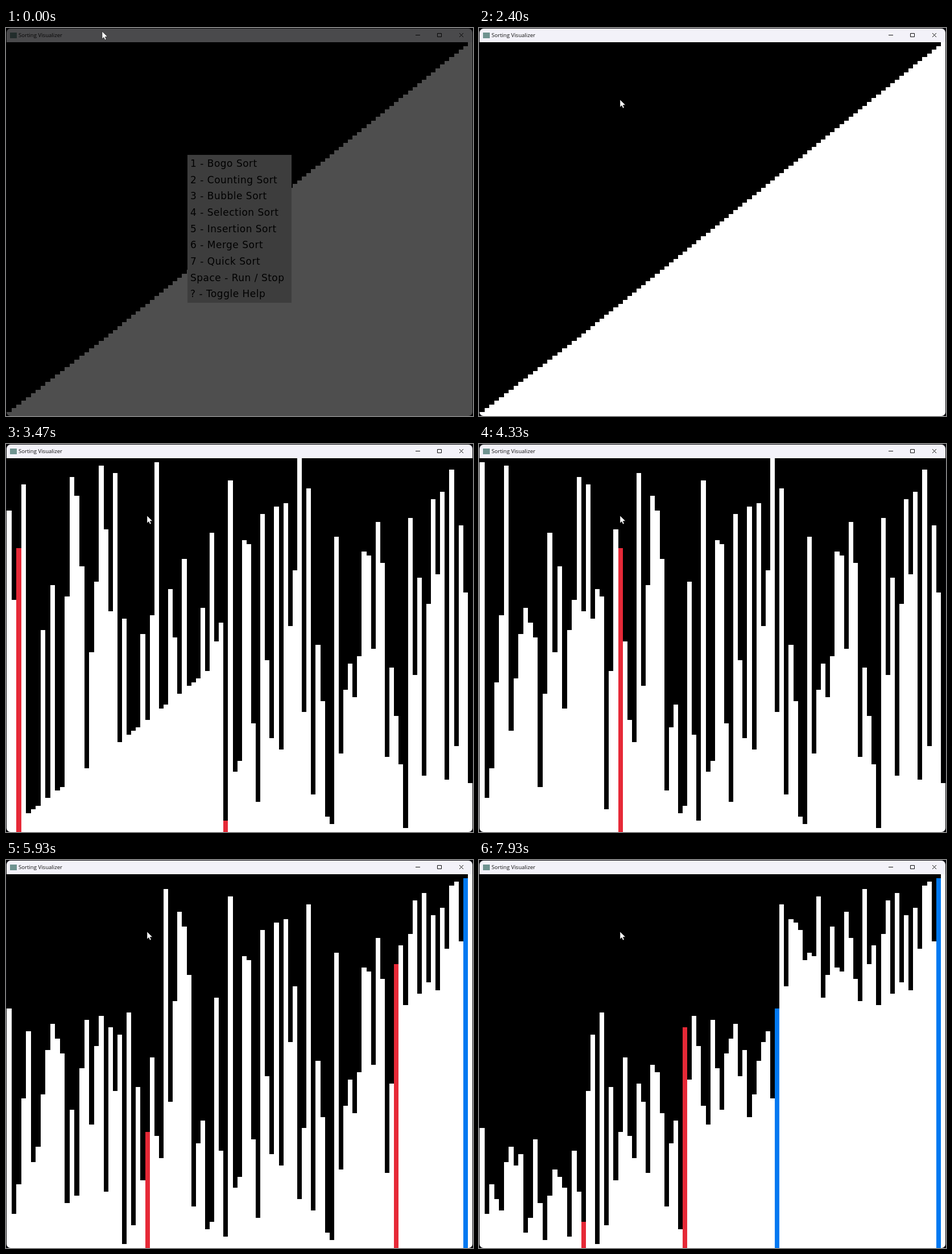
An HTML page with a canvas for the animation above (8000 ms loop, 821 px wide and 682 px high).

```html
<!DOCTYPE html>
<html lang="en">
<head>
<meta charset="utf-8">
<title>Sorting Visualizer</title>
<style>
  html, body { margin: 0; width: 100%; height: 100%; overflow: hidden; background: #000; }
  #stage { position: relative; width: 821px; height: 682px; overflow: hidden; background: #08080c; }
  #stage > * { position: absolute; }
  #win { left: 1px; top: 1px; width: 819px; height: 681px; border-radius: 7px; overflow: hidden; background: #000; }
  #bar { left: 0; top: 0; width: 819px; height: 24px; background: #f3f2f9; }
  #win > *, #bar > * { position: absolute; }
  #icon { left: 6px; top: 7px; width: 12px; height: 10px; background: #6f9390; }
  #title { left: 21px; top: 0; font: 9.6px/24px "Open Sans", sans-serif; color: #111; white-space: nowrap; }
  canvas, svg { left: 0; top: 0; }
  #help { left: 319px; top: 223px; width: 182.5px; height: 260px; background: #c8c8c8; }
  #help div { position: absolute; left: 5px; font: 17px/20px "DejaVu Sans", sans-serif; letter-spacing: .5px; white-space: nowrap; color: #000; }
  #dim { inset: 0; background: rgba(0, 0, 0, .694); }
</style>
</head>
<body>
<div id="stage">
  <div id="win">
    <div id="bar">
      <div id="icon"></div>
      <div id="title">Sorting Visualizer</div>
      <svg width="819" height="24" fill="none" stroke="#111">
        <path d="M719 11.5h8M757.500 8.500h7v6h-7zM796 8l7 7m0-7l-7 7"/>
      </svg>
    </div>
    <canvas id="chart" width="819" height="657" style="top:24px"></canvas>
  </div>
  <div id="help"></div>
  <div id="dim"></div>
  <svg id="cursor" width="14" height="20" viewBox="-1 -1 14 20">
    <path d="M0 0V13L3 10.400L5 15L7.200 14.100L5.200 9.500L9.400 9.300Z" fill="#fff" stroke="#000" stroke-width=".5"/>
  </svg>
</div>
<script>
const LOOP = 8000, TICK = 200 / 3, FIRST_TICK = 43, STEPS_PER_TICK = 6;
const COUNT = 100, RED = '#e62937', BLUE = '#0079f1';

const SHUFFLED = [
  99, 9, 17, 40, 58, 98, 27, 41, 53, 60, 56, 52, 12, 37, 80, 48, 71, 33, 54, 62,
  95, 59, 93, 57, 65, 63, 6, 43, 81, 76, 51, 30, 24, 96, 39, 66, 90, 86, 73, 11,
  28, 34, 5, 7, 67, 26, 3, 94, 16, 19, 78, 77, 29, 8, 85, 46, 25, 87, 22, 88,
  55, 70, 100, 32, 92, 10, 50, 35, 4, 2, 79, 21, 38, 45, 36, 47, 75, 74, 49, 83,
  72, 20, 44, 31, 18, 1, 84, 42, 68, 15, 61, 89, 69, 91, 14, 97, 23, 82, 64, 13
];

const HELP = ['1 - Bogo Sort', '2 - Counting Sort', '3 - Bubble Sort', '4 - Selection Sort',
  '5 - Insertion Sort', '6 - Merge Sort', '7 - Quick Sort', 'Space - Run / Stop', '? - Toggle Help'];

// time, x, y of the pointer
const POINTER = [[0, 169, 6], [70, 178, 19], [130, 184, 28], [330, 195, 45],
  [400, 221, 85], [470, 241, 116], [530, 248, 126]];

const values = Array.from({ length: COUNT }, (_, i) => i + 1);
const placed = [];
const steps = [];

function record(...active) {
  steps.push({ values: [...values], active, placed: [...placed] });
}

function swap(i, j) {
  [values[i], values[j]] = [values[j], values[i]];
  record(i, j);
}

// Fisher-Yates from the right, with picks that lead to the given order
function shuffle() {
  for (let i = COUNT - 1; i > 0; i--) swap(i, values.indexOf(SHUFFLED[i]));
}

function partition(lo, hi) {
  const pivot = values[lo];
  let i = lo, j = hi;
  for (;;) {
    for (; i <= j; i++) {
      record(i);
      if (values[i] > pivot) break;
    }
    for (; j >= i; j--) {
      record(j);
      if (values[j] <= pivot) break;
    }
    if (i >= j) break;
    swap(i, j);
  }
  record();
  swap(lo, j);
  placed.push(j);
  record();
  return j;
}

function quickSort(lo, hi) {
  if (lo >= hi) return;
  const mid = partition(lo, hi);
  quickSort(lo, mid - 1);
  quickSort(mid + 1, hi);
}

record();
shuffle();
for (let i = 0; i < 3; i++) record();
quickSort(0, COUNT - 1);

const $ = id => document.getElementById(id);
const ctx = $('chart').getContext('2d');

HELP.forEach((text, i) => {
  const line = document.createElement('div');
  line.textContent = text;
  line.style.top = 5 + i * 28.65 + 'px';
  $('help').append(line);
});

// 1920 units over 100 bars: the first 20 take one unit more
const barX = i => Math.round((19 * i + Math.min(i, 20)) * 819 / 1920);

function drawChart({ values, active, placed }) {
  ctx.clearRect(0, 0, 819, 657);
  values.forEach((value, i) => {
    const x = barX(i), y = Math.round(656.5 - value * 6.565);
    ctx.fillStyle = active.includes(i) ? RED : placed.includes(i) ? BLUE : '#fff';
    ctx.fillRect(x, y, barX(i + 1) - x, 657 - y);
  });
}

let shown = -1;
function render() {
  const t = performance.now() % LOOP;
  const tick = Math.min(Math.floor((t + 4) / TICK), 119);
  const step = Math.max(0, tick - FIRST_TICK) * STEPS_PER_TICK;
  if (step !== shown) drawChart(steps[shown = step]);
  $('dim').style.display = t < 670 ? '' : 'none';
  $('help').style.display = t < 2400 ? '' : 'none';
  const [, x, y] = POINTER.filter(p => p[0] <= t).pop();
  $('cursor').style.transform = `translate(${x - 1}px, ${y - 1}px)`;
  requestAnimationFrame(render);
}
render();
</script>
</body>
</html>
```
